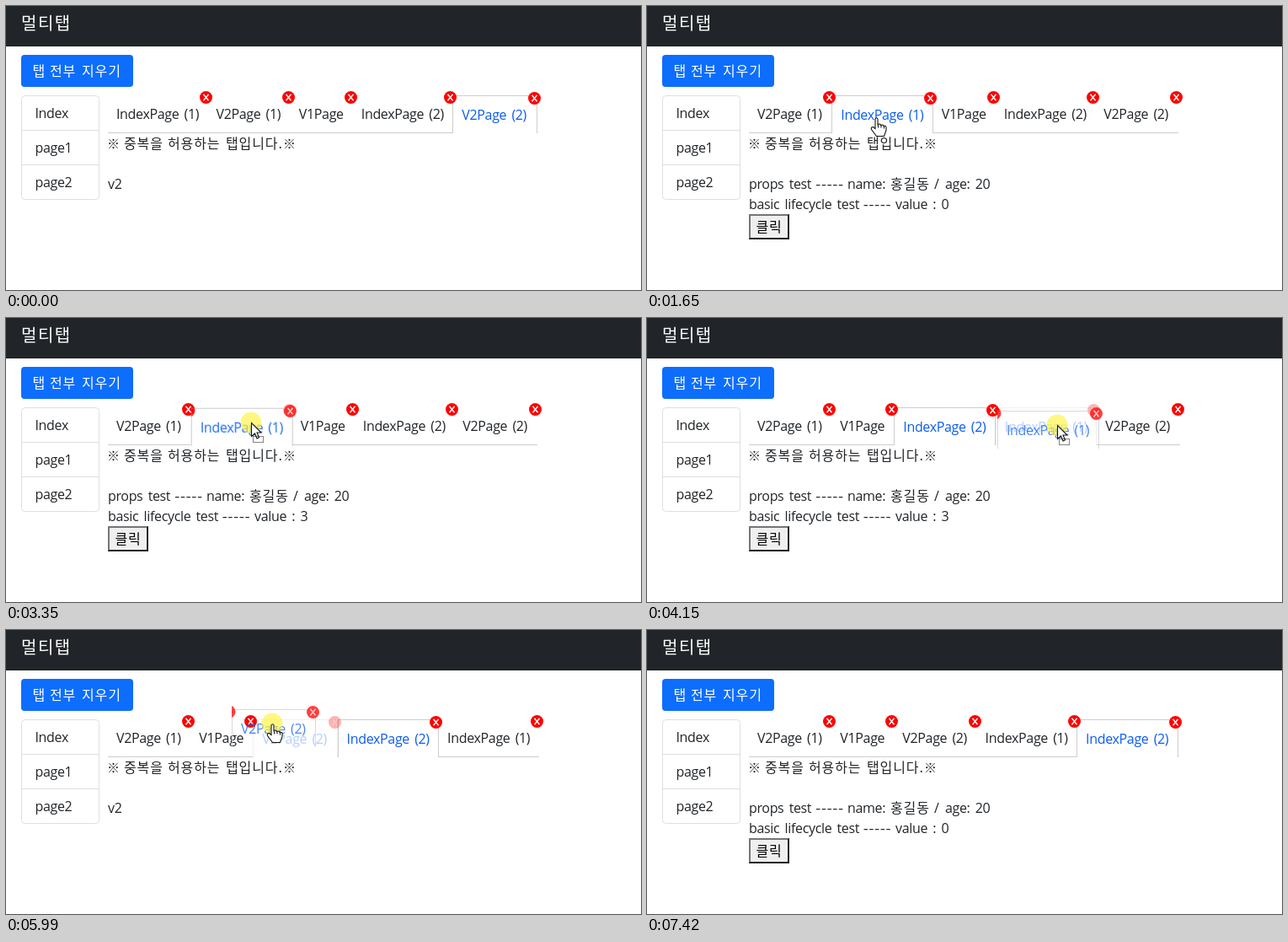
Recreate the animation shown at these times as an HTML page with a canvas. Size 754x337 px, loop 8090 ms.

```html
<!DOCTYPE html>
<html lang="ko">
<head>
<meta charset="utf-8">
<title>멀티탭</title>
<style>
html, body { margin: 0; width: 754px; height: 337px; overflow: hidden; background: #fff }
canvas { display: block }
</style>
</head>
<body>
<canvas id="stage" width="754" height="337"></canvas>
<script>
const g = document.getElementById('stage').getContext('2d');
const LOOP = 8090, DARK = '#212529', LINE = '#cdcdcd', BLUE = '#0b5cf0';

const tabs = {
  a: { label: 'IndexPage (1)', w: 118.5, grab: 71 },
  b: { label: 'V2Page (1)', w: 98.3 },
  c: { label: 'V1Page', w: 74 },
  d: { label: 'IndexPage (2)', w: 118.5, grab: 50 },
  e: { label: 'V2Page (2)', w: 98.3, grab: 48 }
};

// time, tab order, open tab, highlighted tabs, dragged tab, cursor, clicks
const states = [
  [0, 'abcde', 'e', 'e', '', '', 0],
  [70, 'abcde', 'e', 'e', '', 'arrow', 0],
  [420, 'abcde', 'e', 'ea', '', 'hand', 0],
  [960, 'abcde', 'a', 'a', '', 'hand', 0],
  [1100, 'abcde', 'a', 'ab', '', 'arrow', 0],
  [1240, 'abcde', 'a', 'ab', 'a', 'drop', 0],
  [1380, 'bacde', 'a', 'ab', 'a', 'drop', 0],
  [1650, 'bacde', 'a', 'a', '', 'hand', 0],
  [1920, 'bacde', 'a', 'a', '', 'arrow', 0],
  [2730, 'bacde', 'a', 'a', '', 'arrow', 1],
  [2870, 'bacde', 'a', 'a', '', 'arrow', 2],
  [3000, 'bacde', 'a', 'a', '', 'arrow', 3],
  [3180, 'bacde', 'a', 'a', '', 'hand', 3],
  [3350, 'bacde', 'a', 'a', 'a', 'drop', 3],
  [3620, 'bcade', 'a', 'ac', 'a', 'drop', 3],
  [3900, 'bcdae', 'a', 'da', 'a', 'drop', 3],
  [4300, 'bcdae', 'a', 'a', '', 'hand', 3],
  [4470, 'bcdae', 'a', 'ae', '', 'hand', 3],
  [4580, 'bcdae', 'e', 'e', '', 'hand', 3],
  [4650, 'bcdae', 'e', 'e', 'e', 'hand', 3],
  [4800, 'bcdea', 'e', 'ea', 'e', 'hand', 3],
  [5760, 'bceda', 'e', 'ed', 'e', 'hand', 3],
  [6250, 'bceda', 'e', 'e', '', 'hand', 3],
  [6800, 'bceda', 'e', 'ed', '', 'hand', 3],
  [6870, 'bceda', 'd', 'd', '', 'hand', 3],
  [6930, 'bceda', 'd', 'd', 'd', 'drop', 3],
  [7060, 'bcead', 'd', 'da', 'd', 'drop', 3],
  [7280, 'bcead', 'd', 'd', '', 'arrow', 3],
  [7420, 'bcead', 'd', 'd', '', '', 3]
];

// pointer waypoints: time, x, y
const path = [
  [70, 300, 222], [560, 190, 130], [960, 190, 130], [1170, 251, 143], [1240, 251, 143],
  [1720, 275, 130], [1850, 275, 130], [2210, 208, 222], [2270, 208, 222], [2590, 147, 262],
  [3000, 147, 262], [3210, 291, 124], [3350, 291, 124], [4150, 487, 127], [4300, 487, 127],
  [4580, 582, 122], [4650, 582, 122], [4980, 443, 128], [5230, 443, 128], [5240, 437, 131],
  [5320, 437, 131], [5440, 455, 152], [5580, 455, 152], [6000, 313, 110], [6320, 342, 128],
  [6390, 342, 128], [6730, 364, 135], [6800, 364, 135], [6870, 444, 123], [6930, 444, 123],
  [7140, 578, 127], [7210, 578, 127], [7420, 600, 208]
];

const arrow = new Path2D('M0 0V16L4 12.5L6.5 18.5L9 17.3L6.5 11.5H11.5Z');
const hand = new Path2D('M-1.5 1.5Q0-1 1.5 1.5V8Q4 6.5 5 9Q7.5 7.5 8.5 10Q11.5 9 11.5 12V15L9 22H0L-6 14Q-7 11-4 11L-1.5 13Z');

function pointer(t) {
  const i = path.findIndex(p => p[0] > t);
  if (i === 0) return path[0].slice(1);
  if (i < 0) return path[path.length - 1].slice(1);
  const [t0, x0, y0] = path[i - 1], [t1, x1, y1] = path[i], k = (t - t0) / (t1 - t0);
  return [x0 + (x1 - x0) * k, y0 + (y1 - y0) * k];
}

function rect(x, y, w, h, color) {
  g.fillStyle = color;
  g.fillRect(x, y, w, h);
}

function latin(s, x, y, color = DARK) {
  g.font = '16px "Open Sans", "Noto Sans", sans-serif';
  g.letterSpacing = '-0.34px';
  g.wordSpacing = '2.4px';
  g.fillStyle = color;
  g.fillText(s, x, y);
}

function hangul(s, x, y, color = DARK, size = 16, gap = .9) {
  g.font = size + 'px "Noto Sans CJK KR", "Noto Sans CJK", "Noto Sans CJK JP", sans-serif';
  g.letterSpacing = gap + 'px';
  g.wordSpacing = '0px';
  g.fillStyle = color;
  g.fillText(s, x, y);
}

function closeDot(x, y) {
  g.fillStyle = '#f00';
  g.beginPath();
  g.arc(x, y, 7.5, 0, 7);
  g.fill();
  g.strokeStyle = '#fff';
  g.lineWidth = 1.4;
  g.beginPath();
  g.moveTo(x - 3, y - 3.7);
  g.lineTo(x + 3, y + 3.7);
  g.moveTo(x + 3, y - 3.7);
  g.lineTo(x - 3, y + 3.7);
  g.stroke();
}

const tabRight = ({ w }, x, on) => Math.round(x + w + (on ? 2 : 0));

function drawTab(tab, x, y, on) {
  const left = Math.round(x), right = tabRight(tab, x, on);
  if (on) {
    rect(left, y, right - left, 1, LINE);
    rect(left, y, 1, 45, LINE);
    rect(right - 1, y, 1, 45, LINE);
  } else rect(left, y + 44, right - left, 1, LINE);
  latin(tab.label, x + (on ? 11 : 10), y + (on ? 29 : 28), on ? BLUE : DARK);
}

function drawClose(tab, x, y, on) {
  closeDot(tabRight(tab, x, on) - (on ? 3.5 : 2.5), y + (on ? 3.5 : 2.5));
}

function drawGhost(tab, x, y) {
  g.save();
  g.globalAlpha = .75;
  drawTab(tab, x, y, true);
  drawClose(tab, x, y, true);
  // sliver of the neighbouring close button
  g.beginPath();
  g.rect(x, y - 10, 20, 30);
  g.clip();
  closeDot(x - 3, y + 3);
  g.restore();
}

function drawFrame() {
  rect(0, 0, 754, 337, '#fff');
  rect(0, 0, 754, 48, DARK);
  hangul('멀티탭', 18, 27.5, '#fff', 20, 1.5);

  g.fillStyle = '#0d6efd';
  g.beginPath();
  g.roundRect(18, 58, 133, 38, 4);
  g.fill();
  hangul('탭', 31.5, 83, '#fff');
  hangul('전부', 52, 83, '#fff');
  hangul('지우기', 90, 83, '#fff');

  g.strokeStyle = '#dfdfdf';
  g.lineWidth = 1;
  g.beginPath();
  g.roundRect(18.5, 106.5, 92, 123, 4);
  g.stroke();
  ['Index', 'page1', 'page2'].forEach((s, i) => {
    if (i) rect(19, 106 + 41 * i, 91, 1, '#dfdfdf');
    latin(s, 34.5, 133 + 41 * i);
  });

  hangul('※', 120, 169, DARK, 15);
  hangul('중복을', 140, 169);
  hangul('허용하는', 192, 169);
  hangul('탭입니다.', 261, 169);
  hangul('※', 329, 169, DARK, 15);
}

function drawContent(open, clicks) {
  if (open === 'e') return latin('v2', 121, 217);
  const dashes = (x, y) => {
    for (let i = 0; i < 5; i++) rect(x + i * 6.7, y, 4.5, 1.2, DARK);
  };
  latin('props test', 121, 217);
  dashes(201, 212);
  latin('name:', 238, 217);
  hangul('홍길동', 289, 217);
  latin('/', 341, 217);
  latin('age: 20', 354, 217);
  latin('basic lifecycle test', 121, 241);
  dashes(257.5, 236);
  latin('value : ' + (open === 'a' ? clicks : 0), 295, 241);

  rect(121, 247, 48, 30, DARK);
  rect(121, 247, 47, 29, '#767676');
  rect(122, 275, 46, 1, DARK);
  rect(167, 248, 1, 28, DARK);
  rect(123, 249, 44, 26, '#efefef');
  hangul('클릭', 129.5, 268, '#000');
}

function drawCursor(kind, x, y, pressed) {
  if (pressed) {
    g.fillStyle = 'rgba(255,242,60,.65)';
    g.beginPath();
    g.arc(x, y, 12.5, 0, 7);
    g.fill();
  }
  const shape = kind === 'hand' ? hand : arrow;
  g.save();
  g.translate(x + .5, y + .5);
  g.fillStyle = '#fff';
  g.strokeStyle = '#111';
  g.lineWidth = 1.1;
  g.fill(shape);
  g.stroke(shape);
  if (kind === 'hand') {
    rect(1.5, 8, 1, 4, '#111');
    rect(5, 9, 1, 3, '#111');
    rect(8.5, 10, 1, 3, '#111');
  } else if (kind === 'drop') {
    g.setLineDash([1, 1]);
    g.strokeRect(2, 16, 12, 7);
  }
  g.restore();
}

function draw(t) {
  const [, order, open, lit, drag, cursor, clicks] = states.filter(s => s[0] <= t).pop();
  const [x, y] = pointer(t).map(Math.round);
  drawFrame();
  drawContent(open, clicks);

  // close buttons overlap the borders of the tabs beside them
  for (const part of [drawTab, drawClose]) {
    let left = 121;
    for (const id of order) {
      const on = lit.includes(id);
      g.globalAlpha = id === drag ? .3 : 1;
      part(tabs[id], left, 106, on);
      left += tabs[id].w + (on ? 2 : 0);
    }
  }
  g.globalAlpha = 1;

  if (drag) drawGhost(tabs[drag], x - tabs[drag].grab, y - 17);
  const clicking = t > 2660 && t < 3000 && (t - 2660) % 140 < 75;
  if (cursor) drawCursor(cursor, x, y, drag || clicking);
}

const start = performance.now();
function tick() {
  draw((performance.now() - start) % LOOP);
  requestAnimationFrame(tick);
}
tick();
</script>
</body>
</html>
```
